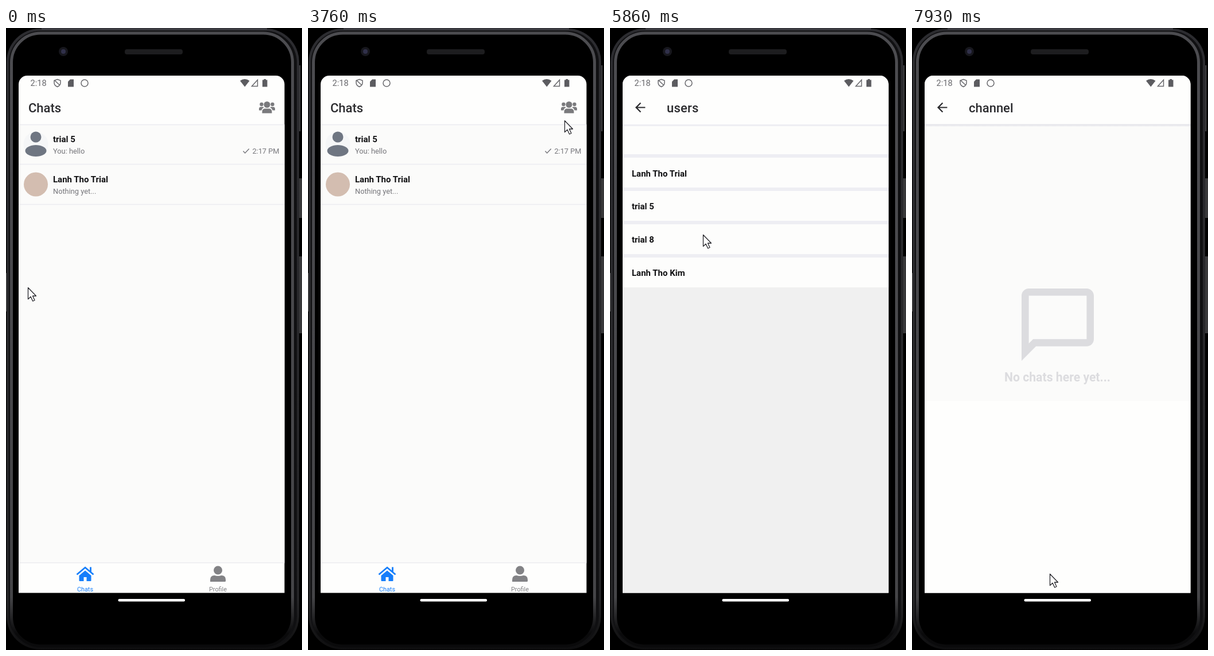
An HTML page that plays this animation: 516x1084 px, repeating every 8000 ms.

```html
<!DOCTYPE html>
<html lang="en">
<head>
<meta charset="utf-8">
<title>Chat app</title>
<style>
  :root {
    --loop: 8s;
    --glide: linear(0, .02 6%, .13 12.5%, .4 16.7%, .67 20.9%, .8 27%, .857 31.8%, .92 42%, .965 56%, .99 78%, 1);
  }
  html, body { margin: 0; width: 100%; height: 100%; overflow: hidden; background: #000; }
  svg { display: block; width: 100%; height: 100%; }
  text { font-family: Roboto, "Noto Sans", sans-serif; }
  .title { font-size: 22px; font-weight: 500; fill: #2b2b2e; }
  .name { font-size: 15px; font-weight: 700; fill: #101012; }
  .note { font-size: 12.8px; fill: #75757a; }
  .tab { font-size: 10.8px; text-anchor: middle; }
  .time { font-size: 14.6px; fill: #68686c; }
  .empty { font-size: 21.2px; font-weight: 700; fill: #dcdcdf; text-anchor: middle; }

  .chats { animation: chats-slide var(--loop) var(--glide) infinite, chats-fade var(--loop) linear infinite; }
  .users { animation: users-slide var(--loop) var(--glide) infinite, users-fade var(--loop) linear infinite; }
  .channel { animation: channel-slide var(--loop) var(--glide) infinite, channel-fade var(--loop) linear infinite; }
  .rows { animation: rows var(--loop) step-end infinite; }
  .blank { animation: blank var(--loop) step-end infinite; }
  .spinner { transform-origin: 254px 179px; animation: spin 1.6s linear infinite; }
  .pointer { animation: pointer var(--loop) ease-in-out infinite; }

  @keyframes chats-slide {
    0%, 55.95% { transform: none; }
    61.575%, 100% { transform: translateX(-46px); }
  }
  @keyframes chats-fade {
    0%, 56.3% { opacity: 1; }
    56.9%, 100% { opacity: 0; }
  }
  @keyframes users-slide {
    0%, 55.95% { transform: translateX(46px); }
    61.575%, 84.75% { transform: none; }
    90.375%, 100% { transform: translateX(-46px); }
  }
  @keyframes users-fade {
    0%, 56.575% { opacity: 0; }
    57.6%, 85.1% { opacity: 1; }
    85.7%, 100% { opacity: 0; }
  }
  @keyframes channel-slide {
    0%, 84.75% { transform: translateX(46px); }
    90.375%, 100% { transform: none; }
  }
  @keyframes channel-fade {
    0%, 85.375% { opacity: 0; }
    86.4%, 100% { opacity: 1; }
  }
  @keyframes rows { 0% { opacity: 0; } 63.75%, 100% { opacity: 1; } }
  @keyframes blank { 0% { opacity: 0; } 93.75%, 100% { opacity: 1; } }
  @keyframes spin { to { transform: rotate(360deg); } }
  @keyframes pointer {
    0% { transform: translate(38px, 452px); }
    26.25% { transform: translate(219px, 552px); }
    47% { transform: translate(447px, 161px); }
    51.5%, 54.5% { transform: translate(454px, 141px); }
    57%, 60% { transform: translate(449px, 156px); }
    73.25%, 82% { transform: translate(162px, 360px); }
    87.5% { transform: translate(236px, 955px); }
    99%, 100% { transform: translate(240px, 951px); }
  }
</style>
</head>
<body>
<svg viewBox="0 0 516 1084" preserveAspectRatio="none">
  <defs>
    <clipPath id="screen"><path d="M22 984.500V98a15 15 0 0 1 15-15H470.500a15 15 0 0 1 15 15V984.500Z"/></clipPath>
    <linearGradient id="shade" x2="0" y2="1">
      <stop stop-color="#e3e3e9"/><stop offset="1" stop-color="#f0f0f2"/>
    </linearGradient>
    <!-- the metal rim darkens towards the bottom corners -->
    <linearGradient id="rim" x2="0" y2="1">
      <stop stop-color="#4c4c50"/><stop offset=".92" stop-color="#454548"/><stop offset=".98" stop-color="#0a0a0b"/>
    </linearGradient>
    <linearGradient id="edge" x2="0" y2="1">
      <stop stop-color="#2c2c30"/><stop offset=".92" stop-color="#242426"/><stop offset="1" stop-color="#0e0e0f"/>
    </linearGradient>
    <path id="back" transform="translate(39.600 125.400) scale(1.090)" d="M20 11H7.830l5.590-5.590L12 4l-8 8 8 8 1.410-1.410L7.830 13H20z" fill="#2b2b2e"/>
  </defs>

  <!-- phone body -->
  <rect width="516" height="1084"/>
  <g fill="#38383a">
    <rect x="511" y="65" width="2.500" height="115"/>
    <rect x="511" y="262" width="5" height="69"/>
    <rect x="511" y="398" width="5" height="134"/>
    <rect y="427" width="2" height="67" fill="#555"/>
  </g>
  <rect x="1" y="1" width="510" height="1082" rx="58" fill="url(#edge)"/>
  <path d="M62 1.500H455" stroke="#4a4a52" stroke-width="2"/>
  <rect x="5" y="5" width="502" height="1075" rx="55" fill="#101012"/>
  <rect x="9.500" y="9" width="490" height="1068" rx="51" fill="#000" stroke="url(#rim)" stroke-width="5"/>
  <rect x="207" y="37" width="101" height="9" rx="4" fill="#1d1d1f"/>
  <circle cx="100" cy="41" r="8" fill="#17171d"/>
  <circle cx="100" cy="41" r="4" fill="#30304a"/>
  <rect x="195.500" y="995" width="116.500" height="4.500" rx="2" fill="#fff"/>

  <g clip-path="url(#screen)">
    <rect x="22" y="83" width="464" height="902" fill="#fefefd"/>

    <g class="chats">
      <rect x="22" y="169" width="464" height="763" fill="#fbfbfa"/>
      <path d="M22 168.500H486M22 237.500H486M22 307.500H486M22 932H486" stroke="#ececf0" stroke-width="1.500"/>
      <text class="title" x="39" y="147">Chats</text>
      <g fill="#7a7a7d">
        <circle cx="455" cy="133.500" r="5.500"/>
        <circle cx="445.500" cy="133" r="3.200"/>
        <circle cx="464.500" cy="133" r="3.200"/>
        <path d="M446.500 148.500v-2.500q0-5.500 5.500-5.500h6q5.500 0 5.500 5.500v2.500zM441 143.500v-2.500q0-3.500 3.500-3.500h4l1 1.200q-3.500 1.500-4 4.800zM469 143.500v-2.500q0-3.500-3.500-3.500h-4l-1 1.200q3.500 1.500 4 4.800z"/>
      </g>
      <circle cx="52" cy="202.500" r="21.500" fill="#f5f6f7"/>
      <g fill="#6f7682">
        <circle cx="52" cy="190" r="9.500"/>
        <ellipse cx="52" cy="214" rx="18.500" ry="10"/>
      </g>
      <circle cx="52" cy="272.500" r="21" fill="#d3bdb0"/>
      <text class="name" x="82" y="198.500">trial 5</text>
      <text class="note" x="82" y="219">You: hello</text>
      <path d="M413.500 214.500l3.200 3.500 7-7.500" fill="none" stroke="#75757a" stroke-width="1.400"/>
      <text class="note" x="476.500" y="219" text-anchor="end">2:17 PM</text>
      <text class="name" x="82" y="268.500">Lanh Tho Trial</text>
      <text class="note" x="82" y="289">Nothing yet...</text>
      <g fill="#157efb">
        <path d="M138 945.500l10.500 8.700v8.800q0 1-1 1h-7v-7h-5v7h-7q-1 0-1-1v-8.800z"/>
        <path d="M123.500 952.500L138 940.300l14.500 12.200M147.500 939.500v8" fill="none" stroke="#157efb" stroke-width="2.800"/>
        <text class="tab" x="138" y="982">Chats</text>
      </g>
      <g fill="#828285">
        <circle cx="369.500" cy="945" r="7.500"/>
        <path d="M356 965v-3.500q0-7.500 7.500-7.500 6 2 12 0 7.500 0 7.500 7.500v2q0 1.500-1.500 1.500z"/>
        <text class="tab" x="369.500" y="982">Profile</text>
      </g>
    </g>

    <g class="users">
      <rect x="22" y="83" width="464" height="86" fill="#fefefd"/>
      <rect x="22" y="168" width="464" height="817" fill="#f0f0f0"/>
      <rect x="22" y="168" width="464" height="4" fill="url(#shade)"/>
      <use href="#back"/>
      <text class="title" x="99" y="147" letter-spacing=".2">users</text>
      <g class="rows">
        <rect x="22" y="168" width="464" height="284" fill="#eeeef3"/>
        <g fill="#fdfdfc">
          <rect x="22" y="171" width="464" height="49"/>
          <rect x="22" y="226" width="464" height="52"/>
          <rect x="22" y="284" width="464" height="52"/>
          <rect x="22" y="342" width="464" height="52"/>
          <rect x="22" y="400" width="464" height="52"/>
        </g>
        <text class="name" x="38" y="258.500">Lanh Tho Trial</text>
        <text class="name" x="38" y="316">trial 5</text>
        <text class="name" x="38" y="374">trial 8</text>
        <text class="name" x="38" y="431.500">Lanh Tho Kim</text>
      </g>
    </g>

    <g class="channel">
      <rect x="22" y="83" width="464" height="86" fill="#fefefd"/>
      <rect x="22" y="168" width="464" height="817" fill="#f0f0f0"/>
      <circle class="spinner" cx="254" cy="179" r="8.500" fill="none" stroke="#35dfc4" stroke-width="2" pathLength="360" stroke-dasharray="200 160" stroke-dashoffset="-30"/>
      <g class="blank">
        <rect x="22" y="168" width="464" height="817" fill="#fefefd"/>
        <rect x="22" y="168" width="464" height="482" fill="#fbfbfa"/>
        <path transform="translate(178.400 441.400) scale(6.300)" fill="#dcdcdf" d="M20 2H4c-1.100 0-2 .9-2 2v18l4-4h14c1.100 0 2-.9 2-2V4c0-1.100-.9-2-2-2zm0 14H5.200L4 17.200V4h16z"/>
        <text class="empty" x="253.500" y="616">No chats here yet...</text>
      </g>
      <rect x="22" y="167.500" width="464" height="4" fill="url(#shade)"/>
      <use href="#back"/>
      <text class="title" x="99" y="147">channel</text>
    </g>

    <!-- status bar -->
    <text class="time" x="42.500" y="101">2:18</text>
    <g fill="none" stroke="#68686c" stroke-width="1.500">
      <path d="M89.500 89.500l5.500 2v4q0 4.500-5.500 7-5.500-2.500-5.500-7v-4zM85 91.500l8.500 8"/>
      <circle cx="137" cy="96" r="6"/>
      <path d="M428.500 101.500h10v-11z"/>
    </g>
    <g fill="#5c5c60">
      <path d="M108 93.500l4-4h6v13h-10z"/>
      <path d="M408 92q8-6 16.500 0l-8.200 10.500z"/>
      <path d="M447 90.500h2.500v-1.500h3.500v1.500h2.500v12h-8.500z"/>
    </g>
  </g>

  <path class="pointer" d="M.5 .5V20.500l4.600-4.200 3.600 7.700 3.300-1.500-3.500-7.500h6z" fill="#fff" stroke="#25252a" stroke-width="1.300" stroke-linejoin="round"/>
</svg>
</body>
</html>
```
